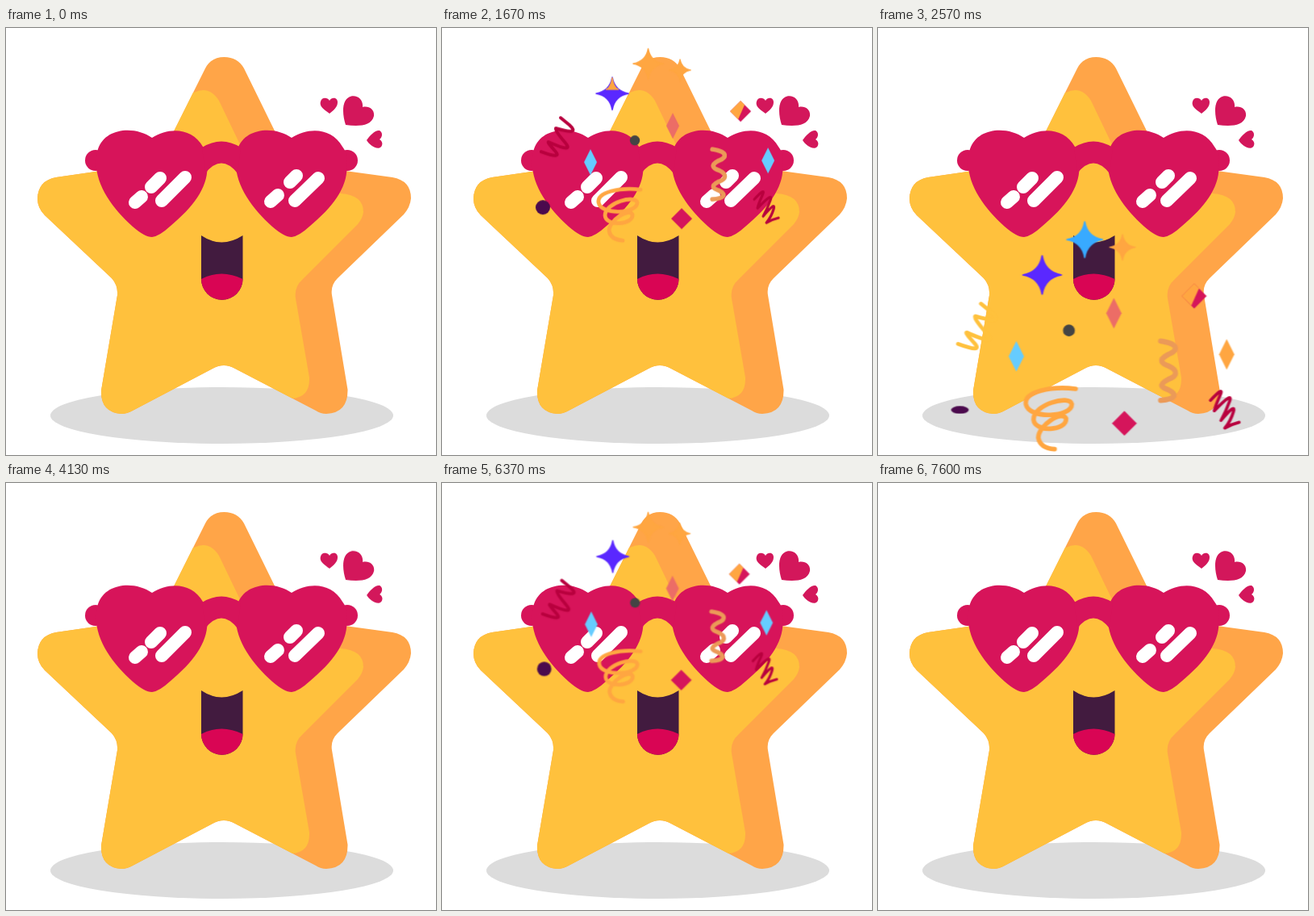
An HTML page without scripts for the animation above (8410 ms loop, 533 by 529 pixels).

```html
<!DOCTYPE html>
<html lang="en">
<head>
<meta charset="utf-8">
<title>Party star</title>
<style>
html, body { margin: 0; width: 100%; height: 100%; overflow: hidden; background: #fff; }
svg { display: block; width: 100%; height: 100%; }

#glasses, #hearts, #confetti, .piece, #cap, #dot { animation: 8.41s linear infinite; }
#glasses { fill: #d7145a; transform-origin: 267px 190px; animation-name: rock; }
#hearts { fill: #d3175b; transform-origin: 428px 117px; animation-name: beat; }
#confetti { transform-origin: 262px 222px; animation-name: fall; }
#dot { transform-origin: 125px 222px; animation-name: squash; }
#cap { fill: #ffa641; stroke: #ffa641; animation-name: uncap; }

.piece { --from: #ffa641; color: var(--c); fill: currentColor; animation-name: tint; }
.late { animation-name: tint-late; }
.fade { animation-name: tint-end; }
.line { fill: none; stroke: currentColor; stroke-linecap: round; stroke-linejoin: round; }
.spark { stroke: currentColor; stroke-width: 1.6; stroke-linejoin: round; }
.shine { fill: none; stroke: #fff; stroke-width: 16; stroke-linecap: round; }

/* Burst from above, spreading as it drops */
@keyframes fall {
  0%, 8.3% { transform: translateY(-232px) scale(.45); opacity: 0; }
  8.32% { transform: translateY(-232px) scale(.45); opacity: 1; }
  10.23% { transform: translateY(-196px) scale(.574); }
  14.74% { transform: translateY(-107px) scale(.82); }
  19.86% { transform: none; }
  25.21% { transform: translate(1px, 123px) scale(1.11); }
  30.9% { transform: translate(2px, 259px) scale(1.19); opacity: 1; }
  33.65% { transform: translate(2px, 328px) scale(1.22); opacity: 0; }
  33.7%, 63.8% { transform: translateY(-232px) scale(.45); opacity: 0; }
  63.85% { transform: translateY(-232px) scale(.45); opacity: 1; }
  65.76% { transform: translateY(-196px) scale(.574); }
  70.27% { transform: translateY(-107px) scale(.82); }
  75.74% { transform: translateY(8px) scale(.987); }
  80.74% { transform: translate(1px, 123px) scale(1.11); }
  86.7% { transform: translate(2px, 259px) scale(1.19); opacity: 1; }
  90.3%, 100% { transform: translate(2px, 340px) scale(1.22); opacity: 0; }
}
@keyframes tint {
  0%, 10.3%, 60%, 65.9% { color: var(--from); }
  14%, 59.9%, 69.5%, 100% { color: var(--c); }
}
@keyframes tint-late {
  0%, 20%, 60%, 75.8% { color: var(--from); }
  22%, 59.9%, 77.8%, 100% { color: var(--c); }
}
@keyframes tint-end {
  0%, 27%, 60%, 83% { color: var(--c); }
  29.5%, 59.9%, 85%, 100% { color: var(--from); }
}
@keyframes uncap {
  0%, 19.95%, 60%, 75.5% { opacity: 1; }
  20.1%, 59.9%, 75.6%, 100% { opacity: 0; }
}
@keyframes squash {
  0%, 29.2%, 60%, 85% { transform: none; }
  30.5%, 59.9%, 86%, 100% { transform: scale(1.03, .45); }
}
@keyframes rock {
  0%, 10.6%, 13.8%, 49.1%, 59.1%, 66.1%, 69.3%, 100% { transform: none; }
  11.4%, 66.9% { transform: rotate(-4deg); }
  12.6%, 68.1% { transform: rotate(4deg); }
  51.6% { transform: rotate(-2.5deg); }
  56.6% { transform: rotate(2.5deg); }
}
@keyframes beat {
  0%, 10.6%, 13.8%, 49.1%, 59.1%, 66.1%, 69.3%, 100% { transform: none; }
  12.2%, 67.7% { transform: translate(11px, -9px) scale(1.25); }
  54.1% { transform: translate(14px, -16px) scale(1.45); }
}
</style>
</head>
<body>
<svg viewBox="0 0 533 529" preserveAspectRatio="none">
  <defs>
    <path id="body" d="M247 50Q254 36 270.5 36Q287 36 295 50L349 160Q353 168 362 169L479 185Q502 189 502 211Q501 222 493 231L411 310Q402 319 404 331L423.5 448Q424 477 397 478Q390 478 384 474L284 422Q270 414 256 422L157 474Q150 478 143 478Q117 476 118 449L138 331Q139 319 131 310L48 232Q39 223 39 211Q40 189 62 185L180 168Q188 166 192 160Z"/>
    <clipPath id="inside"><use href="#body"/></clipPath>
    <path id="lens" d="M181 136C160 121 123 123 114 150C104 185 128 220 157 246Q172 259 181 259Q190 258 203 246C232 222 250 198 249.5 172C250 155 247 151 244 147C231 124 203 122 181 136Z"/>
    <path id="gem" d="M0-16 8 0 0 16-8 0Z"/>
    <path id="square" d="M0-13 13 0 0 13-13 0Z"/>
    <path id="spark" d="M0-20Q3-3 20 0Q3 3 0 20Q-3 3-20 0Q-3-3 0-20Z"/>
  </defs>

  <ellipse cx="267.5" cy="480" rx="212.5" ry="35" fill="#dcdcdc"/>
  <use href="#body" fill="#ffa548"/>
  <path clip-path="url(#inside)" fill="#ffc13d" d="M233 80Q252 71 264 90L300 165L415 205Q443 207 443 228Q442 236 436 243L367 312Q357 321 359 335L376 433Q377 458 354 459V529H0V80Z"/>

  <path fill="#421b3f" d="M242 257Q267 274 293.5 257V311A25.7 25.7 0 0 1 242 311Z"/>
  <path fill="#d90554" d="M242 311Q267 298 293.5 311A25.7 25.7 0 0 1 242 311Z"/>

  <g id="glasses">
    <circle cx="111" cy="164" r="13"/>
    <circle cx="423" cy="164" r="13"/>
    <use href="#lens"/>
    <use href="#lens" x="173"/>
    <path d="M243 148Q267 133 291 148L287 180Q267 155 247 180Z"/>
    <path class="shine" d="M160 216L168 209M180 197L191 186M193 214L222 185M328 215L337 207M352 191L360 183M358 214L387 186"/>
  </g>

  <g id="hearts">
    <path d="M401 106C394 101 388 97 390 91C391 86 398 85 401 90C404 85 411 86 411 92C411 98 406 102 401 106Z"/>
    <path d="M421 120C417 108 415 88 428 84.5C437 83 443 90 442 98C450 96 457 101 456 109C453 122 436 122 421 120Z"/>
    <path d="M447 139C451 133 458 126 463 127C467 129 467 135 463 138C468 141 467 147 463 148.5C457 150 450 144 447 139Z"/>
  </g>

  <g id="confetti">
    <g id="dot"><circle class="piece" style="--c:#4b0a4d;--from:#9b6199" cx="125" cy="222" r="9"/></g>
    <circle class="piece" style="--c:#444" cx="239" cy="139" r="6.2"/>
    <path class="piece line" style="--c:#ffa641" stroke-width="4.8" d="M246 200C220 197 192 203 194 216C197 232 242 230 242 216C240 206 202 216 202 232C203 246 237 244 236 231C232 222 207 238 207 251Q209 262 224 263"/>
    <path class="piece line" style="--c:#eb9a58" stroke-width="5.5" d="M335 150C356 153 352 161 343 164C331 170 337 174 343 176C354 181 352 187 343 190C331 196 337 199 343 201C353 206 350 211 335 212"/>
    <path class="piece line" style="--c:#b8003e" stroke-width="3.2" d="M387 212Q402 196 397 207T391 223Q411 202 407 213T398 233Q414 214 411 224T402 241Q409 237 417 235"/>
    <path class="piece line fade" style="--c:#b8003e;--from:#ffc13d" stroke-width="4" d="M123 153Q150 163 140 152T132 141Q165 156 152 141T141 124Q172 133 158 120L147 111"/>
    <use href="#gem" class="piece" style="--c:#66ccff" x="184" y="166"/>
    <use href="#gem" class="piece fade" style="--c:#66ccff" x="404" y="164"/>
    <use href="#gem" class="piece" style="--c:#ec6d66" x="286" y="121"/>
    <use href="#square" class="piece" style="--c:#d5155b" x="297" y="236"/>
    <g transform="translate(370 103)">
      <use href="#square" class="piece" style="--c:#d5155b"/>
      <path fill="#ffa641" d="M0-13L-13 0L-3 10L5-8Z"/>
    </g>
    <g transform="translate(211 81)">
      <use href="#spark" class="piece spark" style="--c:#5a28ff"/>
      <path id="cap" d="M0-20Q2-7 8-5H-8Q-2-7 0-20Z"/>
    </g>
    <g transform="translate(255.5 44) scale(.93)"><use href="#spark" class="piece spark late" style="--c:#38aaff"/></g>
    <g transform="translate(295 52) scale(.67)"><use href="#spark" class="piece spark" style="--c:#ffa641"/></g>
  </g>
</svg>
</body>
</html>
```
